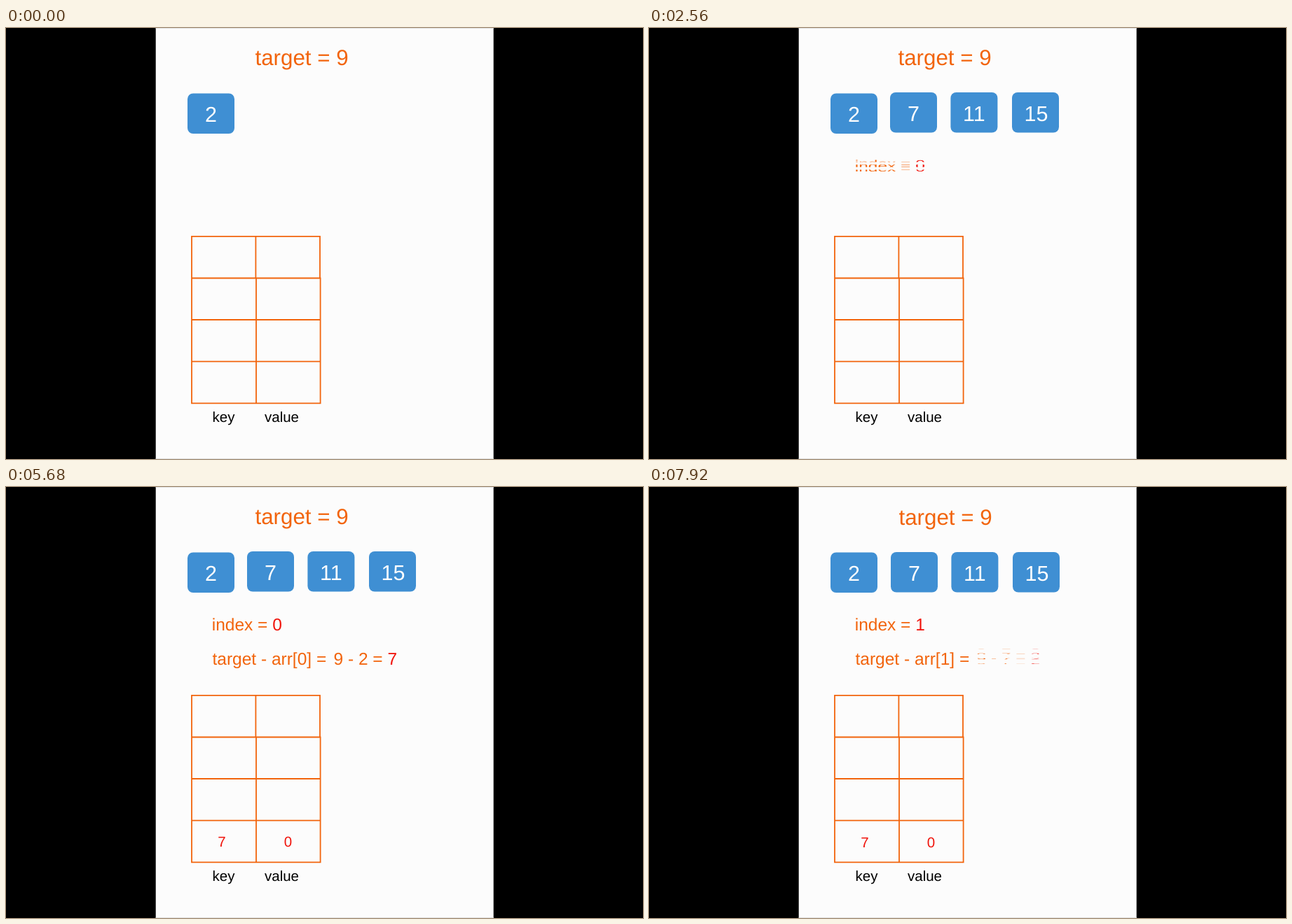
An HTML page for the animation above (8 s loop, 909 px wide and 616 px high).

```html
<!DOCTYPE html>
<html lang="en">
<head>
<meta charset="utf-8">
<title>Two sum with a hash table</title>
<style>
  html, body { margin: 0; width: 100%; height: 100%; overflow: hidden; background: #000; }
  svg { display: block; }
  #stage { position: absolute; left: 0; top: 0; }
  text { font-family: "Liberation Sans", Arial, sans-serif; white-space: pre; text-rendering: geometricPrecision; }
</style>
</head>
<body>
<svg id="stage" width="909" height="616" viewBox="0 0 909 616"></svg>
<script>
const NS = 'http://www.w3.org/2000/svg';
const LOOP = 8000, TICK = 80, CUT = 6000;
const SLATS = 5, OPEN = 400;
const ORANGE = '#f2640c', RED = '#f0140c', BLUE = '#3f8fd3';
const stage = document.getElementById('stage');

function add(parent, tag, attrs = {}) {
  const el = document.createElementNS(NS, tag);
  for (const k in attrs) el.setAttribute(k, attrs[k]);
  parent.appendChild(el);
  return el;
}

function label(parent, x, y, size, fill, str, anchor = 'start') {
  const el = add(parent, 'text', { x, y, 'font-size': size, fill, 'text-anchor': anchor });
  el.textContent = str;
  return el;
}

function block(parent, x, y, str, tx = x + 33.5) {
  add(parent, 'rect', { x, y, width: 67, height: 57.6, rx: 8, fill: BLUE });
  label(parent, tx, y + 40.5, 30.5, '#fff', str, 'middle');
}

// Text in orange with its last part in red
function line(parent, x, y, str, result = '') {
  const el = label(parent, x, y, 24.5, ORANGE, str);
  const end = add(el, 'tspan', { fill: RED });
  end.textContent = result;
}

const cell = (parent, x, y, str) => label(parent, x, y, 20.5, RED, str, 'middle');

// Static backdrop and table
add(stage, 'rect', { width: 909, height: 616, fill: '#000' });
add(stage, 'rect', { x: 213.7, width: 482, height: 616, fill: '#fcfcfc' });
for (const y of [0, 615]) add(stage, 'rect', { x: 213.7, y, width: 482, height: 1, fill: '#e2e2e2' });
add(stage, 'path', {
  d: 'M265 297.8H448V357.5H448.6V536.4H265ZM265 357.5H448M265 417H448.6M265 476.6H448.6M356.4 297.8V357.5H357V536.4',
  fill: 'none', stroke: ORANGE, 'stroke-width': 1.8
});
label(stage, 294.5, 562.5, 20.5, '#000', 'key');
label(stage, 369, 562.5, 20.5, '#000', 'value');
block(stage, 259, 93.5, '2');

const first = add(stage, 'g'), second = add(stage, 'g');

// An item that opens like a row of turning blinds
function blinds(scene, start, top, height, draw) {
  const whole = add(scene, 'g');
  draw(whole);
  const h = height / SLATS;
  const slats = Array.from({ length: SLATS }, (_, i) => {
    const el = add(scene, 'svg', {
      x: 0, width: 909, viewBox: `0 ${top + i * h} 909 ${h}`, preserveAspectRatio: 'none', overflow: 'hidden'
    });
    draw(el);
    return el;
  });
  return t => {
    const p = Math.min(1, Math.max(0, (t - start) / OPEN));
    const turn = Math.sin(p * p * (3 - 2 * p) * Math.PI / 2);
    const moving = turn > 0 && turn < 0.995;
    whole.style.display = turn >= 0.995 ? '' : 'none';
    slats.forEach((el, i) => {
      el.style.display = moving ? '' : 'none';
      if (!moving) return;
      const mid = top + height / 2 + (i - (SLATS - 1) / 2) * h * (0.94 + 0.06 * turn);
      el.setAttribute('y', mid - h * turn / 2);
      el.setAttribute('height', h * turn);
    });
  };
}

const title = (scene, x, y) => label(scene, x, y, 31.3, ORANGE, 'target = 9');
title(first, 355.5, 53.2);
title(second, 356.5, 54.2);
block(second, 345, 93, '7');
block(second, 431.4, 93, '11');
block(second, 519, 93, '15', 553.5);
cell(second, 308, 514.8, '7');
cell(second, 402.5, 514.8, '0');

const ROW1 = [178, 38], ROW2 = [226, 39], CELL = [490, 34], BLOCK = [92, 58];
const items = [
  blinds(first, 490, ...BLOCK, g => block(g, 344, 92, '7')),
  blinds(first, 1030, ...BLOCK, g => block(g, 430.4, 92, '11')),
  blinds(first, 1850, ...BLOCK, g => block(g, 518, 92, '15', 552.5)),
  blinds(first, 2410, ...ROW1, g => line(g, 293.7, 205.2, 'index = ', '0')),
  blinds(first, 3030, ...ROW2, g => line(g, 294.5, 253.5, 'target - arr[0] =')),
  blinds(first, 3770, ...ROW2, g => line(g, 467.5, 253.5, '9 - 2 = ', '7')),
  blinds(first, 4630, ...CELL, g => cell(g, 402.5, 514, '0')),
  blinds(first, 5290, ...CELL, g => cell(g, 308, 514, '7')),
  blinds(second, 6570, ...ROW1, g => line(g, 293.7, 205.2, 'index = ', '1')),
  blinds(second, 7130, ...ROW2, g => line(g, 294.5, 253.5, 'target - arr[1] =')),
  blinds(second, 7830, ...ROW2, g => line(g, 467.5, 253.5, '9 - 7 = ', '2'))
];

function render(ms) {
  const t = Math.floor((ms % LOOP) / TICK) * TICK;
  first.style.display = t < CUT ? '' : 'none';
  second.style.display = t < CUT ? 'none' : '';
  for (const item of items) item(t);
}

let origin;
function frame(now) {
  origin ??= now;
  render(now - origin);
  requestAnimationFrame(frame);
}
render(0);
requestAnimationFrame(frame);
</script>
</body>
</html>
```
